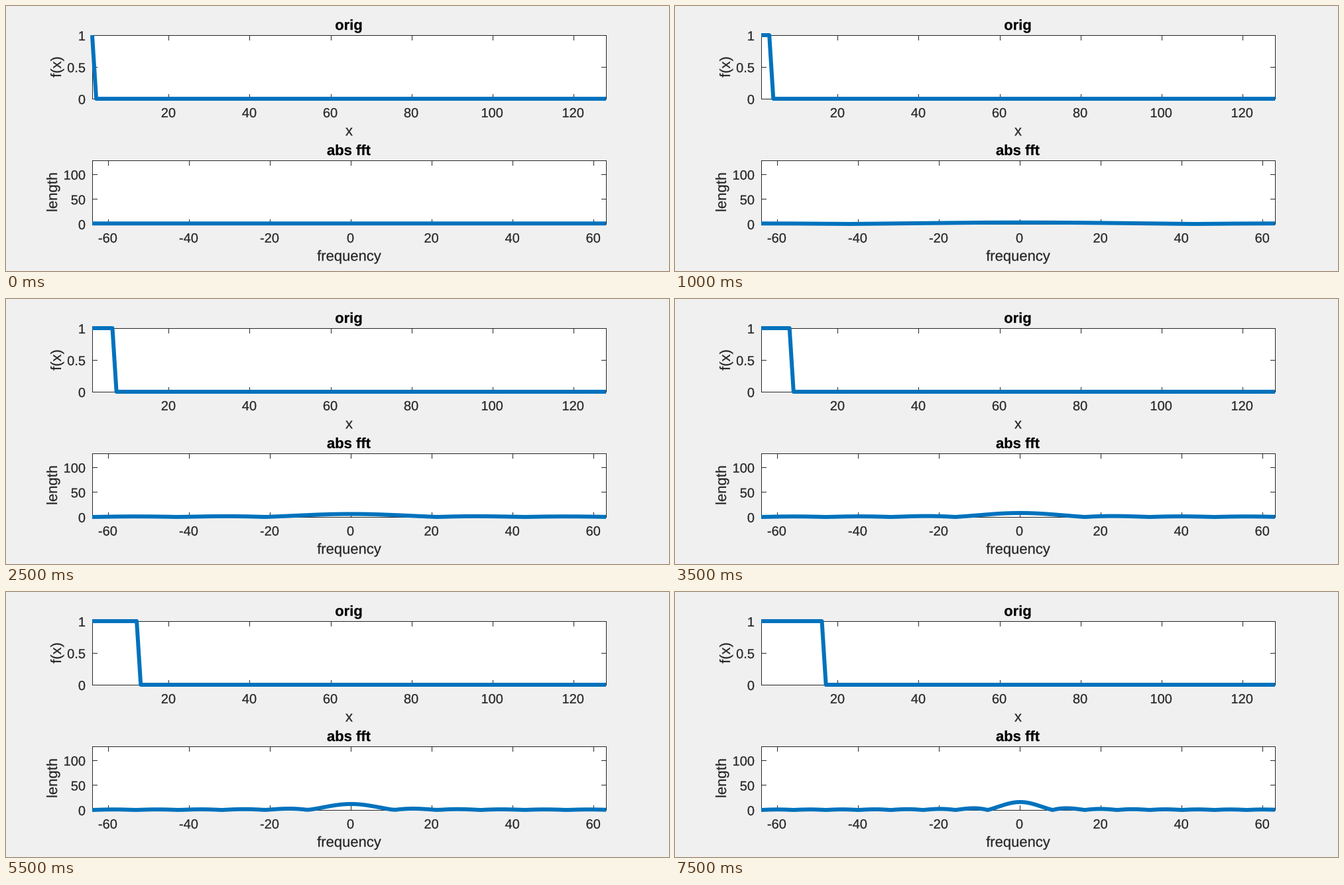
These frames come from a looping animation (1000x400 px, 8 s). A matplotlib script:

```python
import math

import numpy as np
import matplotlib.pyplot as plt
from matplotlib.animation import FuncAnimation
from matplotlib.patches import Rectangle
from matplotlib.patheffects import Stroke

W, H, DPI = 1000, 400, 100
N = 128
STEPS, STEP_MS = 16, 500
LEFT, RIGHT, PANEL_H = 130, 905, 96
INK, BLUE, BACK = "#262626", "#0072bd", "#f0f0f0"
TICK = 7

plt.rcParams["font.family"] = "Liberation Sans"
plt.rcParams["text.hinting"] = "none"

fig = plt.figure(figsize=(W / DPI, H / DPI), dpi=DPI, facecolor=BACK)
ax = fig.add_axes([0, 0, 1, 1])
ax.set_xlim(0, W)
ax.set_ylim(H, 0)
ax.axis("off")


def pt(px):
    return px * 72 / DPI


def text(x, y, s, size=22, color=INK, ha="center", **kw):
    # A hairline outline gives unhinted glyphs at sub-pixel positions.
    ax.text(x, y, s, fontsize=pt(size), color=color, ha=ha, va="baseline",
            rotation_mode="anchor",
            path_effects=[Stroke(linewidth=pt(0.25), foreground=color)], **kw)


def rule(x0, y0, x1, y1):
    """One-pixel line through the centres of the given pixels."""
    ax.plot([x0 + 0.5, x1 + 0.5], [y0 + 0.5, y1 + 0.5], color=INK, lw=pt(1),
            solid_capstyle="projecting", snap=False, zorder=2)


class Panel:
    """A boxed plot in pixel space with inward ticks on all four sides."""

    def __init__(self, top, x0, ymax, xticks, yticks, title, xlabel, ylabel, ylabel_x):
        self.top, self.bottom = top, top + PANEL_H
        self.x0, self.ymax = x0, ymax
        ax.add_patch(Rectangle((LEFT, top), RIGHT - LEFT, PANEL_H,
                               fc="white", ec="none", zorder=1))
        for y in (self.top, self.bottom):
            rule(LEFT, y, RIGHT, y)
        for x in (LEFT, RIGHT):
            rule(x, self.top, x, self.bottom)

        for v in xticks:
            x = self.px(v)
            col = math.floor(x)
            rule(col, self.bottom, col, self.bottom - TICK)
            rule(col, self.top, col, self.top + TICK)
            text(x - 1, self.bottom + 28, str(v), 20)
        for v in yticks:
            y = self.py(v)
            row = math.floor(y)
            rule(LEFT, row, LEFT + TICK, row)
            rule(RIGHT, row, RIGHT - TICK, row)
            text(120, y + 8, str(v), 20, ha="right")

        mid = (LEFT + RIGHT) / 2
        text(mid - 0.5, top - 8, title, color="black", weight="bold")
        text(mid, self.bottom + 55.5, xlabel)
        text(ylabel_x, top + PANEL_H / 2, ylabel, rotation=90)

        self.x = self.px(x0 + np.arange(N))
        self.line, = ax.plot([], [], color=BLUE, lw=pt(6), zorder=3, snap=False,
                             solid_capstyle="butt", solid_joinstyle="round")

    def px(self, v):
        return LEFT + (v - self.x0) * (RIGHT - LEFT) / (N - 1)

    def py(self, v):
        return self.bottom - v * PANEL_H / self.ymax

    def show(self, values):
        self.line.set_data(self.x, self.py(values))


signal = Panel(44, 1, 1, range(20, 121, 20), (0, 0.5, 1),
               "orig", "x", "f(x)", 83)
spectrum = Panel(233, -N // 2, N, range(-60, 61, 20), (0, 50, 100),
                 "abs fft", "frequency", "length", 77)


def update(i):
    pulse = (np.arange(N) <= i).astype(float)
    signal.show(pulse)
    spectrum.show(np.fft.fftshift(np.abs(np.fft.fft(pulse))))
    return signal.line, spectrum.line


anim = FuncAnimation(fig, update, frames=STEPS, interval=STEP_MS,
                     init_func=lambda: update(0), repeat=True,
                     repeat_delay=0, blit=False)
plt.show()
```
